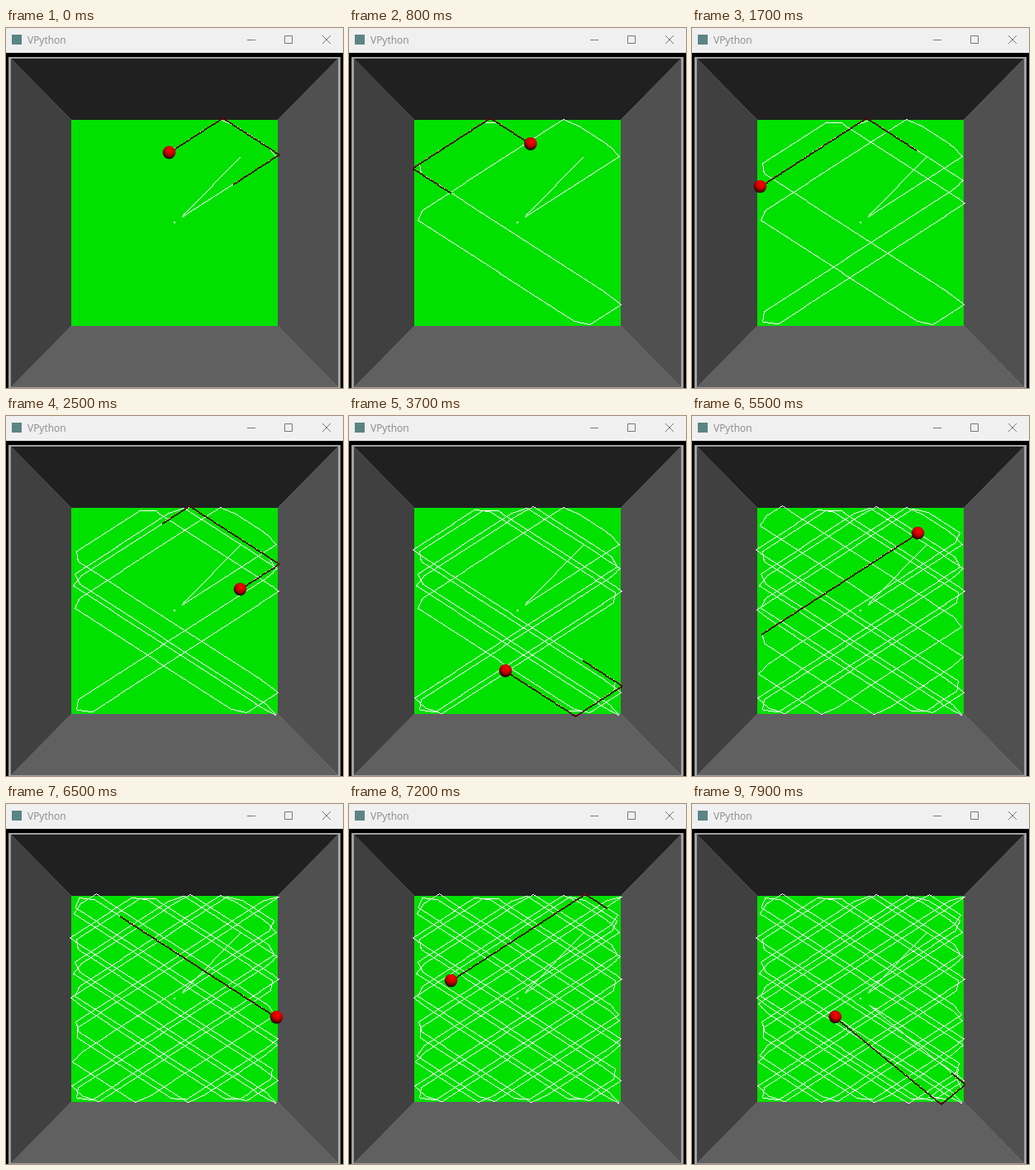
Recreate the animation shown at these times as an HTML page with a canvas. Size 408 by 435 pixels, loop 8 s.

```html
<!DOCTYPE html>
<html>
<head>
<meta charset="utf-8">
<style>
html, body { margin: 0; width: 408px; height: 435px; overflow: hidden; background: #000; }
canvas { position: absolute; left: 0; top: 0; }
header { position: absolute; width: 408px; height: 30px; background: #f0f0f0; color: #888;
  font: 12px/30px "Open Sans", sans-serif; }
header span { position: absolute; left: 26px; }
header i { position: absolute; left: 7px; top: 8px; width: 12px; height: 12px; background: #5b8583; }
header svg { position: absolute; left: 0; top: 0; fill: none; stroke: #777; }
</style>
</head>
<body>
<canvas width="408" height="435"></canvas>
<header><i></i><span>VPython</span>
<svg width="408" height="30"><path d="M292 14.5h10M337.5 9.5h9v9h-9zM383 9l10 10M393 9l-10 10"/></svg>
</header>
<script>
const g = document.querySelector('canvas').getContext('2d');

// Range of the ball's centre, and the two points where it hits the obstacle
const LEFT = 77, TOP = 108.5, SIZE = 254;
const HIT1 = [213.5, 228.5], HIT2 = [212.5, 241.5], U2 = 7856;
const SAMPLE = 18.889, STEP = SAMPLE / 10, TAIL = SAMPLE * 10;

// Distance travelled after each step count
const KEYS = [[0, 251], [17, 1890], [25, 2705], [36, 3815], [54, 5648], [64, 6718], [78, 8156]];

function fold(v, lo) {
  const m = ((v - lo) % (2 * SIZE) + 2 * SIZE) % (2 * SIZE);
  return lo + Math.min(m, 2 * SIZE - m);
}

function at(u) {
  let [x, y] = HIT1, dx = u, slope = -0.645;
  if (u > U2) {
    [x, y] = HIT2;
    dx = (u - U2) * 0.9206;
    slope = 0.819;
  }
  return [fold(x + dx, LEFT), fold(y + dx * slope, TOP)];
}

function travelled(ms) {
  let n = Math.floor(ms / 100);
  if (n >= 36) n--; // one beat of rest
  const i = Math.max(1, KEYS.findIndex(k => k[0] >= n));
  const [n0, u0] = KEYS[i - 1], [n1, u1] = KEYS[i];
  return u0 + (u1 - u0) * (n - n0) / (n1 - n0);
}

function poly(color, ...pts) {
  g.fillStyle = color;
  g.beginPath();
  pts.forEach(p => g.lineTo(...p));
  g.fill();
}

// Hard-edged line, visiting every pixel once
function eachPixel(pts, visit) {
  for (let i = 1; i < pts.length; i++) {
    const [x0, y0] = pts[i - 1], [x1, y1] = pts[i];
    const n = Math.ceil(Math.max(Math.abs(x1 - x0), Math.abs(y1 - y0)));
    for (let j = 0; j < n; j++) {
      visit(Math.floor(x0 + (x1 - x0) * j / n), Math.floor(y0 + (y1 - y0) * j / n));
    }
  }
}

function room() {
  g.fillStyle = '#000';
  g.fillRect(0, 0, 408, 435);
  g.fillStyle = '#a0a0a0';
  g.fillRect(3, 35, 402, 400);
  const a = [6, 37], b = [402, 37], c = [402, 434], d = [6, 434];
  const e = [79, 111], f = [329, 111], h = [329, 360], k = [79, 360];
  poly('#202020', a, b, f, e);
  poly('#505050', b, c, h, f);
  poly('#606060', c, d, k, h);
  poly('#404040', d, a, e, k);
  g.fillStyle = '#00e100';
  g.fillRect(79, 111, 250, 249);
}

function ball(x, y) {
  const s = g.createRadialGradient(x + 1, y - 3, 1, x + 1, y - 3, 11);
  s.addColorStop(0, '#f80000');
  s.addColorStop(0.45, '#c80000');
  s.addColorStop(1, '#100000');
  g.fillStyle = s;
  g.beginPath();
  g.arc(x, y, 7.8, 0, 7);
  g.fill();
}

function draw(now) {
  const u = travelled(now % 8000);
  room();

  const path = [[283.5, 156], [216.5, 224], HIT1];
  for (let s = 0.3; s <= u; s += SAMPLE) path.push(at(s));
  g.fillStyle = '#fff';
  eachPixel(path, (x, y) => g.fillRect(x, y, 1, 1));
  g.fillRect(203, 234, 2, 2);

  const tail = [];
  for (let s = u - TAIL; s <= u; s += STEP) tail.push(at(s));
  g.fillStyle = '#200000';
  eachPixel(tail, (x, y) => g.fillRect(x, y, 1, 2));
  g.fillStyle = '#c00000';
  eachPixel(tail, (x, y) => x % 2 && g.fillRect(x, y, 1, 1));
  ball(...at(u));
}

const start = performance.now();
function tick() {
  draw(performance.now() - start);
  requestAnimationFrame(tick);
}
tick();
</script>
</body>
</html>
```
